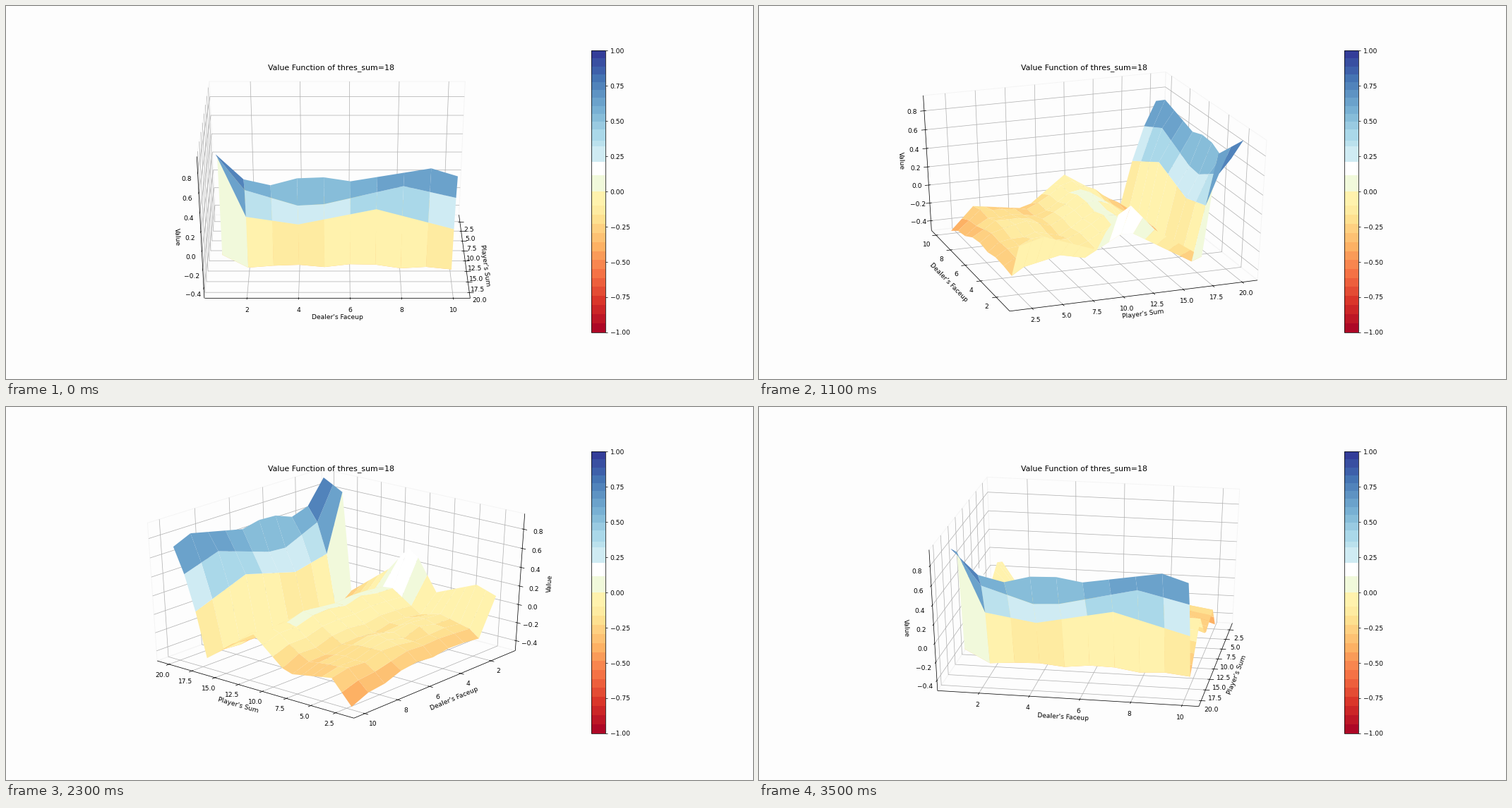
Recreate the animation shown at these times as a matplotlib script. Size 1058 px wide and 529 px high, loop 3.6 s.

```python
import numpy as np
import matplotlib.pyplot as plt
from matplotlib.animation import FuncAnimation
from matplotlib.cm import ScalarMappable
from matplotlib.collections import LineCollection, PolyCollection
from matplotlib.colors import ListedColormap, Normalize, to_rgba

FRAMES, INTERVAL = 36, 100
ELEV, DIST = np.radians(30), 10
BACK = "#fdfdfd"

plt.rcParams["font.family"] = "DejaVu Sans"
fig = plt.figure(figsize=(16, 8), dpi=66.125, facecolor=BACK)
ax = fig.add_axes([0.125, 0.125, 0.62, 0.755])
cax = fig.add_axes([0.78375, 0.125, 0.018875, 0.755])

# Axis limits, padded box and ticks
lo = np.array([1.1, 0.55, -0.482])
hi = np.array([20.9, 10.45, 0.93])
mid, span = (lo + hi) / 2, hi - lo
delta = span / 12
box_lo, box_hi = lo - delta / 4, hi + delta / 4
PER_POINT = 48 / (72 * (16 * 0.62 + 8 * 0.755))

TICKS = [np.arange(2.5, 20.1, 2.5), np.arange(2, 11, 2), np.arange(-2, 5) * 0.2]
FORMATS = ["{:.1f}", "{:.0f}", "{:.1f}"]
LABELS = ["Player's Sum", "Dealer's Faceup", "Value"]
TICK_DIR = [1, 0, 0]
FLIPPED = [1, 0, 0]  # dimension in which each axis line sits on the near side


def through(x, **points):
    """Straight lines through points given as x2=value, x4=value, ..."""
    return np.interp(x, [int(k[1:]) for k in points], list(points.values()))


def make_values():
    """Value for player sums 2..20 (rows) and dealer cards 1..10 (columns)."""
    hit, dealer = np.arange(2, 18), np.arange(2, 11)
    ace = through(hit, x2=.10, x4=.17, x8=-.02, x10=.31, x11=.39, x13=.11, x17=-.24)
    two = through(hit, x2=-.30, x3=-.22, x6=-.14, x8=-.20, x11=.01, x12=0, x17=-.38)
    ten = through(hit, x2=-.48, x4=-.23, x8=-.31, x9=-.275, x12=.01, x17=-.40)

    # While hitting, the value sags late towards the ten, with small ripples
    t = (dealer - 2) / 8
    body = two[:, None] + np.outer(ten - two, t ** 3) + 0.03 * np.sin(np.pi * t)
    body[:, 1:-1] += np.where(dealer[1:-1] % 3 == 2, -0.02, 0.01)
    body[1:-1, 1:-1] += np.random.default_rng(4).normal(0, 0.01, (14, 7))

    # From 18 on the player sticks
    stick = [through(dealer, x2=.21, x4=.13, x7=.29, x10=.08),
             through(dealer, x2=.53, x4=.37, x5=.385, x8=.57, x10=.45),
             through(dealer, x2=.68, x3=.62, x4=.69, x5=.70, x6=.66, x9=.79, x10=.71)]
    first = np.append(ace, np.linspace(.82, .93, 3))
    return np.column_stack([first, np.vstack([body, stick])])


def make_cmap():
    """Red-yellow-blue in uneven flat bands."""
    edges = np.concatenate([np.linspace(-1, -0.1, 15),
                            [0, 0.115, 0.21, 0.32, 0.36],
                            np.linspace(0.44, 1, 11)])
    bands = plt.get_cmap("RdYlBu")(((edges[:-1] + edges[1:]) / 2 + 1) / 2)
    bands[14:17] = [to_rgba(c) for c in ("#fff2ad", "#f1f9db", "#ffffff")]
    centers = np.linspace(-1, 1, 801)[:-1] + 1 / 800
    return ListedColormap(bands[np.searchsorted(edges, centers) - 1])


values = make_values()
cmap, norm = make_cmap(), Normalize(-1, 1)
gx, gy = np.meshgrid(np.arange(2, 21), np.arange(1, 11), indexing="ij")
grid = np.stack([gx, gy, values], axis=-1)
quads = np.stack([grid[:-1, :-1], grid[:-1, 1:], grid[1:, 1:], grid[1:, :-1]],
                 axis=2).reshape(-1, 4, 3)
quad_colors = cmap(norm(quads[..., 2].mean(axis=1)))

bar = fig.colorbar(ScalarMappable(norm, cmap), cax=cax,
                   ticks=np.linspace(-1, 1, 9))


def project(points, azim):
    """Perspective view: plane coordinates and depth."""
    d = (np.asarray(points, float) - mid) / span
    ca, sa, ce, se = np.cos(azim), np.sin(azim), np.cos(ELEV), np.sin(ELEV)
    front = d[..., 0] * ca + d[..., 1] * sa
    right = d[..., 1] * ca - d[..., 0] * sa
    up = d[..., 2] * ce - front * se
    depth = DIST - front * ce - d[..., 2] * se
    return np.stack([right, up], axis=-1) / depth[..., None], depth


def push_out(point, points, index):
    """Move a point away from the box centre, except along its own axis."""
    step = points * PER_POINT * delta
    step[index] = 0
    return point + np.where(point < mid, -step, step)


def add_lines(lines, color, width, z):
    ax.add_collection(LineCollection(lines, colors=color, linewidths=width, zorder=z),
                      autolim=False)


def draw_panes(far, near, azim):
    panes = []
    for i in range(3):
        a, b = (i + 1) % 3, (i + 2) % 3
        corners = np.tile(far, (5, 1))
        corners[1:3, a] = near[a]
        corners[2:4, b] = near[b]
        panes.append(project(corners, azim)[0])
    add_lines(panes, "#f4f4f4", 1, 1)


def draw_axis(i, far, near, azim):
    start = far.copy()
    start[FLIPPED[i]] = near[FLIPPED[i]]
    end = start.copy()
    end[i] = near[i]
    edge = project([start, end], azim)[0]

    # Grid lines run over both far planes
    ticks = TICKS[i]
    path = np.tile(far, (len(ticks), 3, 1))
    path[:, :, i] = ticks[:, None]
    a, b = (i + 1) % 3, (i + 2) % 3
    path[:, 0, a] = near[a]
    path[:, 2, b] = near[b]
    add_lines(project(path, azim)[0], "#b0b0b0", 0.8, 2)

    k = TICK_DIR[i]
    sign = np.sign(far[k] - near[k])
    marks = np.tile(start, (len(ticks), 2, 1))
    marks[:, :, i] = ticks[:, None]
    marks[:, 0, k] += 0.1 * sign * delta[k]
    marks[:, 1, k] -= 0.2 * sign * delta[k]
    add_lines([edge, *project(marks, azim)[0]], "black", 0.8, 3)

    for t in ticks:
        pos = start.copy()
        pos[i] = t
        x, y = project(push_out(pos, 11.5, i), azim)[0]
        text = FORMATS[i].format(t).replace("-", "\u2212")
        ax.text(x, y, text, ha="center", va="top", fontsize=10, zorder=3)

    w, h = ax.bbox.size
    dx, dy = (edge[1] - edge[0]) * (w, h)
    angle = np.degrees(np.arctan2(dy, dx)) % 180
    if angle > 90:
        angle -= 180
    x, y = project(push_out((start + end) / 2, 25, i), azim)[0]
    ax.text(x, y, LABELS[i], ha="center", va="center", fontsize=10,
            rotation=angle, zorder=3)


def draw(frame):
    azim = np.radians(-10 * frame)
    ax.clear()
    ax.set_axis_off()
    ax.set_xlim(-0.095, 0.09)
    ax.set_ylim(-0.095, 0.09)
    ax.set_title("Value Function of thres_sum=18", fontsize=12, y=0.92, pad=6)

    eye = np.array([np.cos(azim), np.sin(azim), 1])
    far = np.where(eye < -1e-9, box_hi, box_lo)
    near = box_lo + box_hi - far
    draw_panes(far, near, azim)
    for i in range(3):
        draw_axis(i, far, near, azim)

    flat, depth = project(quads, azim)
    order = np.argsort((DIST / depth).mean(axis=1), kind="stable")
    ax.add_collection(PolyCollection(flat[order], facecolors=quad_colors[order],
                                     edgecolors="none", linewidths=0, zorder=5),
                      autolim=False)
    return []


anim = FuncAnimation(fig, draw, frames=FRAMES, interval=INTERVAL,
                     init_func=lambda: draw(0), repeat=True, repeat_delay=0,
                     blit=False)
plt.show()
```
